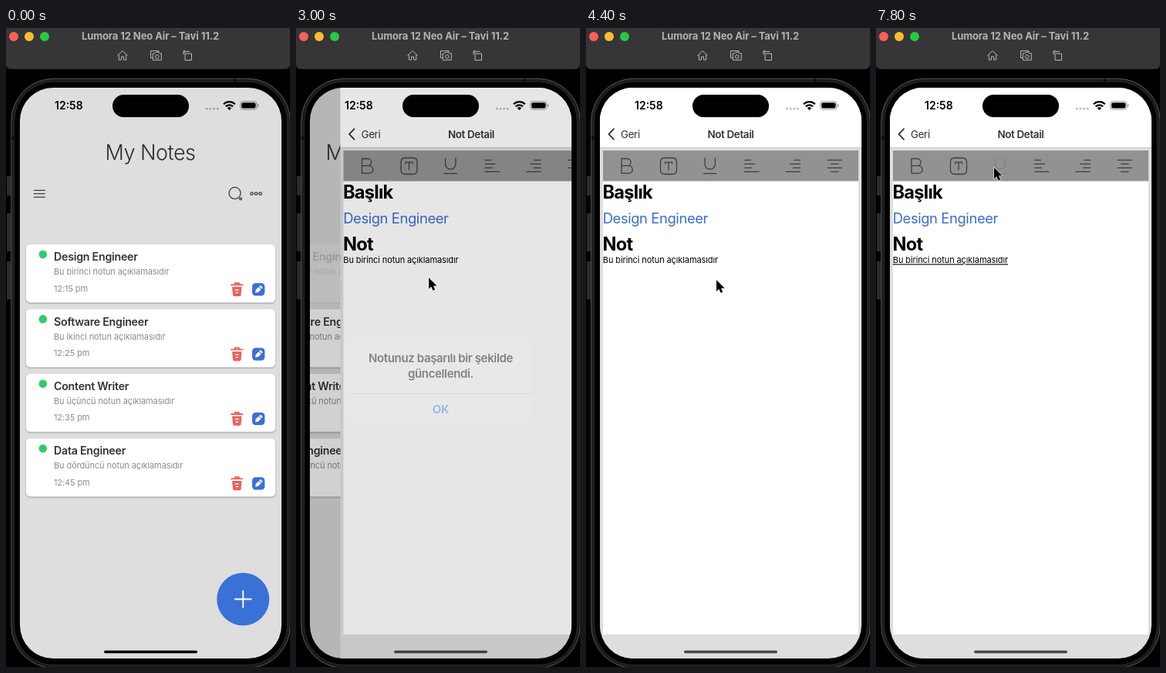
Animation of 368x824 px, one loop 8 s. Source, as an HTML page:

```html
<!DOCTYPE html>
<html lang="tr">
<head>
<meta charset="utf-8">
<title>Notes app</title>
<style>
html, body { margin: 0; width: 100%; height: 100%; overflow: hidden; background: #000; }
svg { display: block; width: 368px; height: 824px; font-family: Inter, "Open Sans", sans-serif; }
.line { fill: none; stroke: #3f3f3f; stroke-width: 1.3; stroke-linecap: round; stroke-linejoin: round; }
.tool { fill: none; stroke: #b9b9b9; stroke-width: 1; stroke-linejoin: round; }
.mid { text-anchor: middle; }
.window { font-size: 13px; font-weight: 700; fill: #b2b2b2; letter-spacing: -.1px; }
.clock { font-size: 14px; font-weight: 600; }
.heading { font-size: 27px; font-weight: 300; fill: #2d2d2d; letter-spacing: -.5px; }
.job { font-size: 14.2px; font-weight: 600; fill: #333; letter-spacing: -.24px; }
.small { font-size: 11px; fill: #8c8c8c; letter-spacing: -.1px; }
.nav { font-size: 13.4px; fill: #333; letter-spacing: -.35px; }
.label { font-size: 23.6px; font-weight: 700; letter-spacing: -.75px; }
.field { font-size: 18.4px; fill: #396fcb; letter-spacing: -.4px; }
.alert { font-size: 13.4px; font-weight: 600; letter-spacing: -.32px; }
.card { filter: drop-shadow(0 1px 1.3px rgba(0, 0, 0, .3)); }
</style>
</head>
<body>
<svg id="stage" viewBox="0 0 368 824"></svg>
<script>
const LOOP = 8000, STEP = 200, WIDTH = 339;

const notes = [
  ["Design Engineer", "birinci", "12:15"],
  ["Software Engineer", "ikinci", "12:25"],
  ["Content Writer", "üçüncü", "12:35"],
  ["Data Engineer", "dördüncü", "12:45"]
];

// Each row: time, then values
const cursorPath = [
  [400, 222, 790], [600, 208, 668], [800, 186, 520], [1000, 158, 385],
  [1200, 146, 335], [1400, 149, 332], [1600, 158, 327], [2000, 172, 322],
  [3400, 172, 322], [3600, 181, 350], [3800, 199, 440], [4000, 207, 475],
  [4200, 208, 470], [4400, 169, 325], [4600, 84, 191], [4800, 42, 187],
  [5000, 42, 187], [5200, 56, 187], [5400, 64, 187], [5600, 66, 186],
  [5800, 65, 185], [6200, 68, 183], [6400, 85, 182], [6600, 104, 181],
  [7000, 108, 181], [7200, 121, 182], [7400, 144, 183], [7600, 152, 182],
  [7800, 153, 180]
];
const slidePath = [[2600, WIDTH], [2800, 323], [3000, 39.5], [3200, 2], [3400, 0]];
const dimPath = [[2800, 0], [3000, .43], [3200, 1], [4000, 1], [4200, .43], [4400, 0]];
const zoomPath = [[2800, 1.2], [3000, 1.12], [3200, 1.01], [3400, 1]];
const cardPath = [[2200, 1], [2400, .5], [2600, .2]];
const pressPaths = {
  bold: [[5600, 1], [5800, .2], [6000, .65], [6200, 1]],
  plain: [[6600, 1], [6800, .2], [7000, .65], [7200, 1]],
  under: [[7600, 1], [7800, .2]]
};

function at(path, t) {
  const i = path.findIndex(row => row[0] > t);
  if (i === 0) return path[0].slice(1);
  if (i < 0) return path[path.length - 1].slice(1);
  const a = path[i - 1], b = path[i], k = (t - a[0]) / (b[0] - a[0]);
  return a.slice(1).map((v, j) => v + (b[j + 1] - v) * k);
}

const text = (cls, x, y, str, extra = "") => `<text class="${cls}" x="${x}" y="${y}" ${extra}>${str}</text>`;
const rect = (x, y, w, h, fill, r = 0, extra = "") =>
  `<rect x="${x}" y="${y}" width="${w}" height="${h}" rx="${r}" fill="${fill}" ${extra}/>`;
const dot = (x, y, r, fill, extra = "") => `<circle cx="${x}" cy="${y}" r="${r}" fill="${fill}" ${extra}/>`;
const path = (d, cls = "line", extra = "") => `<path class="${cls}" d="${d}" ${extra}/>`;
const group = (id, body, extra = "") => `<g id="${id}" ${extra}>${body}</g>`;

const trash = `<g transform="translate(291 328)">
  <path d="M1 3.2h14.4M5.2 3l.8-2h4.6l.8 2" fill="none" stroke="#e8625f" stroke-width="1.9" stroke-linecap="round"/>
  <path d="M2 5.8h12.4l-.9 10.4q-.2 1.8-2 1.8H5q-1.800 0-2-1.800z" fill="#e8625f"/>
  <path d="M5.700 9.700h5M6.500 13.200h3.400" stroke="#fff" stroke-width="1.300"/></g>`;
const pencil = rect(319, 329, 16.3, 16.3, "#3a70d6", 4.5) +
  `<g transform="translate(327.200 337.200) rotate(45)" fill="#fff">
  <path d="M-2.200-2.300h4.400v5L0 6-2.200 2.700z"/><rect x="-2.200" y="-5.800" width="4.400" height="2.600" rx="1"/></g>`;

const card = ([title, order, time], i) => group("card" + i,
  rect(26, 279, 323, 75, "#fff", 5.5, 'class="card"') +
  dot(47.8, 292, 5.3, "#32cb70") +
  text("job", 62, 300.3, title) +
  text("small", 62, 318.3, `Bu ${order} notun açıklamasıdır`) +
  text("small", 62, 339.7, time + " pm") + trash + pencil,
  `transform="translate(0 ${i * 83.4})"`);

const list = rect(18, 77, WIDTH, 736, "#dedede") +
  text("heading mid", 187, 169.5, "My Notes") +
  path("M36.300 209.300h14M36.300 213.700h14M36.300 218.100h14") +
  `<g class="line"><circle cx="296.500" cy="212.900" r="7.500"/><circle cx="304" cy="220.300" r="1.400"/>` +
  [318.5, 324, 329.5].map(x => `<circle cx="${x}" cy="213.600" r="1.800"/>`).join("") + "</g>" +
  notes.map(card).join("") +
  dot(307.2, 736.5, 34, "#3a71d7") +
  path("M296.700 736.500h21M307.200 726v21", "line", 'style="stroke:#fff;stroke-width:1.900"') +
  rect(18, 77, WIDTH, 736, "#000", 0, 'id="shade"');

const icons =
  group("bold", path("M46 168.500h7.500a4.600 4.600 0 0 1 0 9.200H46zM46 177.700h9.500a4.800 4.800 0 0 1 0 9.600H46z")) +
  group("plain", path("M102 167.500h10q5.500 0 5.500 5.500v10q0 5.500-5.500 5.500h-10q-5.500 0-5.500-5.500v-10q0-5.500 5.500-5.500zM102.500 175v-1.800h9v1.800M107 173.200v9.600")) +
  group("under", path("M154 168v7.500a6.700 6.700 0 0 0 13.400 0V168M152.500 187.700h16.500")) +
  path("M205.500 170.300h8M205.500 175.300h13M205.500 180.300h9M205.500 185.300h18.500") +
  path("M277.500 170.300h-8M277.500 175.300h-13M277.500 180.300h-9M277.500 185.300H259") +
  path("M313 170.300h18.500M317.500 175.300h9.500M313 180.300h18.500M317.500 185.300h9.500");

const detail = rect(18, 77, WIDTH, 736, "#dedede") +
  rect(18, 77, WIDTH, 77, "#fff") + rect(18, 153.8, WIDTH, .8, "#c4c4c4") +
  path("M36 130.200l-6.500 6.700 6.500 6.700", "line", 'style="stroke-width:1.900;stroke:#333"') +
  text("nav", 45, 141.6, "Geri") +
  text("nav mid", 187.5, 141.6, "Not Detail", 'font-weight="600"') +
  rect(22, 197, 331, 585, "#fff") + rect(22, 158, 331, 39.5, "#929292") + icons +
  text("label", 21.5, 220.3, "Başlık") +
  text("field", 21.7, 252, "Design Engineer") +
  text("label", 21.5, 287.3, "Not") +
  text("small", 21.8, 303.3, "Bu birinci notun açıklamasıdır", 'id="body" style="fill:#000"');

const status = text("clock", 63, 105.2, "12:58") +
  rect(138, 86, 99, 29, "#000", 14.5) +
  [260.3, 265, 269.6, 274.2].map(x => dot(x, 104, 1.6, "#000", 'opacity=".25"')).join("") +
  `<g fill="none" stroke="#000" stroke-width="2.300"><path d="M282 98.200a10.400 10.400 0 0 1 14.800 0"/>
  <path d="M284.700 101.300a6.700 6.700 0 0 1 9.400 0"/></g><path d="M286.700 103.300a3.900 3.900 0 0 1 5.400 0l-2.700 2.600z"/>` +
  rect(303.6, 94.7, 21.4, 10.4, "none", 3.3, 'stroke="#000" stroke-opacity=".4"') +
  rect(305.1, 96.2, 18.4, 7.4, "#000", 2) +
  rect(326, 98.2, 1.3, 3.5, "#000", .6, 'opacity=".4"');

const alertBox = rect(81, 405, 213, 99.5, "#ececec", 9.5) + rect(81, 469.3, 213, .7, "#c6c6c6") +
  text("alert mid", 187.5, 433.5, "Notunuz başarılı bir şekilde") +
  text("alert mid", 187.5, 451.2, "güncellendi.") +
  text("alert mid", 187.5, 492.6, "OK", 'fill="#2f7de6"');

const frame = rect(0, -10, 368, 63, "#363537", 6) +
  ["#ff5f57", "#febc2e", "#28c840"].map((c, i) => dot(10 + i * 20, 11, 6, c)).join("") +
  text("window mid", 187, 15.3, "Lumora 12 Neo Air – Tavi 11.2") +
  path("M144.500 35.500l6.500-6 6.500 6M146.300 34.500v6.500h3.200v-4h3v4h3.200v-6.500", "tool") +
  path("M190 38.500h-2.500v-9h10.500v2M190.300 32.700h2.500l1-1.400h4l1 1.400h2.500v8.600h-11z", "tool") +
  `<circle class="tool" cx="195.800" cy="37" r="2.300"/>` +
  path("M232 33h8.500v8.500H232zM238 30.300h-8v4M232 28.300l-2 2 2 2", "tool") +
  [[191, 25], [239, 49], [301, 49]].map(([y, h]) => rect(1, y, 5.5, h, "#2b2b2b", 1.2)).join("") +
  rect(6.8, 65.3, 361.5, 760, "#1c1c1c", 55, 'stroke="#555" stroke-width="1"') +
  rect(10.8, 69.3, 353.5, 752, "#000", 51, 'stroke="#333" stroke-width=".7"') +
  rect(294.5, 65.5, 4, 3.5, "#0c0c0c") + rect(7, 140, 3.5, 4, "#0c0c0c");

document.getElementById("stage").innerHTML =
  `<defs><clipPath id="screen">${rect(18, 77, WIDTH, 736, "#000", 43)}</clipPath></defs>` + frame +
  `<g clip-path="url(#screen)">` + group("list", list) + group("detail", detail) + status +
  rect(127, 802.7, 121, 3.6, "#000", 1.8, 'id="home"') +
  rect(18, 77, WIDTH, 736, "#000", 0, 'id="dim"') + group("alert", alertBox) + "</g>" +
  group("cursor", `<path d="M0 0v14.500l3.300-3.100 2.200 5.100 2.700-1.100-2.200-5h4.600z"
    stroke="#fff" stroke-width="1.200" stroke-linejoin="round" paint-order="stroke"/>`);

const el = id => document.getElementById(id);
const set = (id, attrs) => Object.entries(attrs).forEach(([k, v]) => el(id).setAttribute(k, v));

function draw(t) {
  const [slide] = at(slidePath, t), [dim] = at(dimPath, t), [zoom] = at(zoomPath, t);
  const [x, y] = at(cursorPath, t), shown = 1 - slide / WIDTH;
  set("cursor", { transform: `translate(${x} ${y})`, opacity: t < 400 ? 0 : 1 });
  set("list", { transform: `translate(${-102 * shown} 0)` });
  set("shade", { opacity: .1 * shown });
  set("detail", { transform: `translate(${slide} 0)` });
  set("card0", { opacity: at(cardPath, t)[0] });
  set("dim", { opacity: .23 * dim });
  set("alert", { opacity: dim, transform: `translate(187.5 455) scale(${zoom}) translate(-187.5 -455)` });
  set("home", { fill: shown > .5 ? "#484848" : "#000" });
  for (const id in pressPaths) set(id, { opacity: at(pressPaths[id], t)[0] });
  set("body", {
    "font-weight": t >= 5800 && t < 6800 ? 700 : 400,
    "text-decoration": t >= 7800 ? "underline" : "none"
  });
}

const start = performance.now();
function tick() {
  const t = (performance.now() - start) % LOOP;
  draw(Math.floor(t / STEP) * STEP);
  requestAnimationFrame(tick);
}
tick();
</script>
</body>
</html>
```
